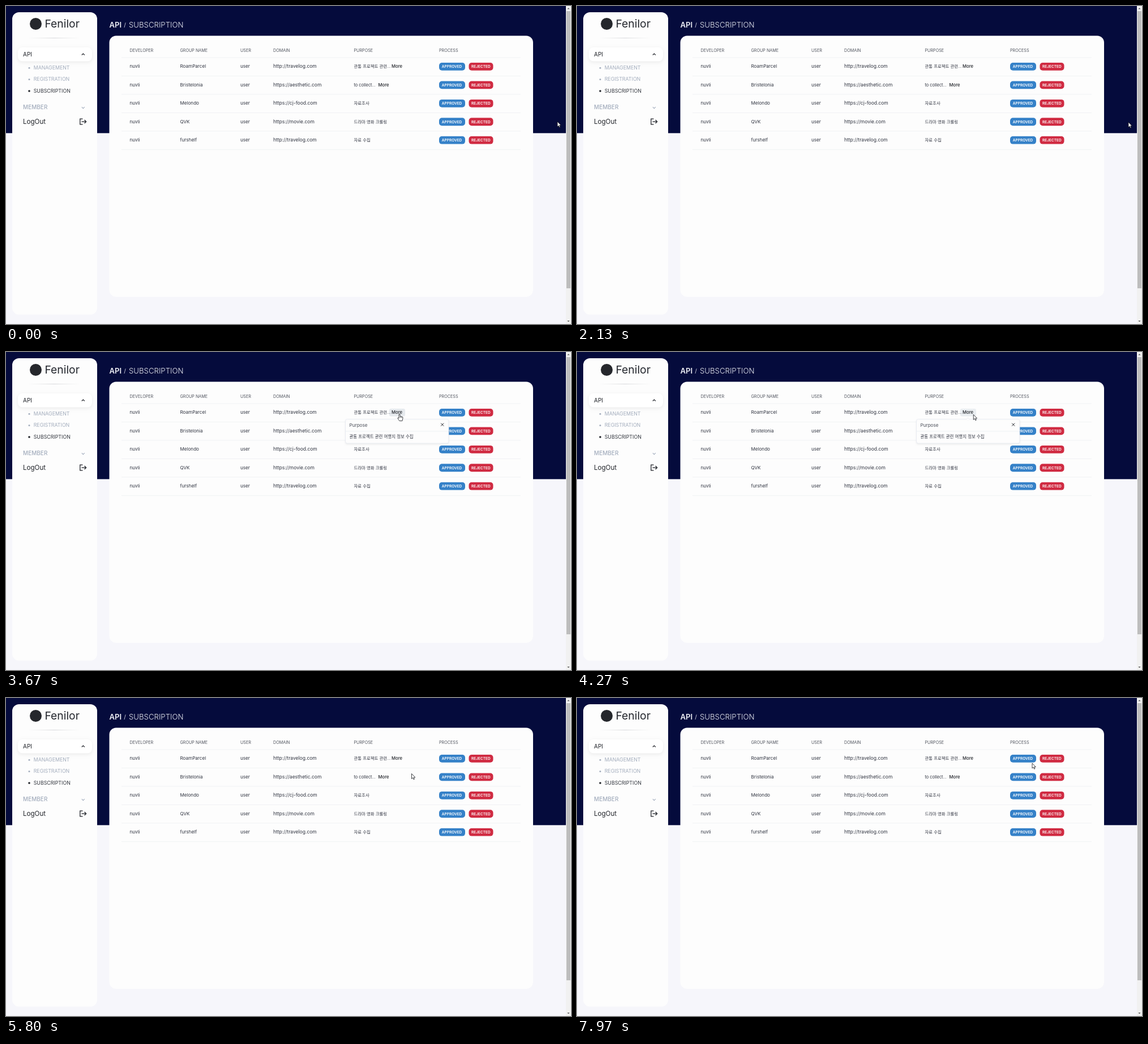
Recreate the animation shown at these times as an HTML page with a canvas. Size 998 by 561 pixels, loop 8 s.

```html
<!DOCTYPE html>
<html lang="en">
<head>
<meta charset="utf-8">
<title>API subscription</title>
<style>
html, body { margin: 0; width: 100%; height: 100%; overflow: hidden; background: #f6f6fb; }
canvas { display: block; width: 998px; height: 561px; }
</style>
</head>
<body>
<canvas id="stage"></canvas>
<script>
const W = 998, H = 561, LOOP = 8000;
const canvas = document.getElementById('stage');
const ctx = canvas.getContext('2d');
const ratio = window.devicePixelRatio || 1;
canvas.width = W * ratio;
canvas.height = H * ratio;

const FONT = 'Inter, "Noto Sans CJK KR", "Noto Sans CJK", sans-serif';
const INK = '#303440', CARD = '#fdfdfd', GREY = '#a3adbd';

const rows = [
  ['nuvli', 'RoamParcel', 'user', 'http://travelog.com', '관통 프로젝트 관련...', 681],
  ['nuvli', 'Bristelonia', 'user', 'https://aesthetic.com', 'to collect...', 657.5],
  ['nuvli', 'Melondo', 'user', 'https://cj-food.com', '자료조사'],
  ['nuvli', 'QVK', 'user', 'https://movie.com', '드라마 영화 크롤링'],
  ['nuvli', 'furshelf', 'user', 'http://travelog.com', '자료 수집']
];
const columns = [218.5, 307.5, 414, 472, 614.5, 765];
const headings = ['DEVELOPER', 'GROUP NAME', 'USER', 'DOMAIN', 'PURPOSE', 'PROCESS'];

const popups = [
  { x: 599.5, y: 118.5, tip: 690.5, body: '관통 프로젝트 관련 여행지 정보 수집', from: 3340, to: 5240 },
  { x: 576, y: 151, tip: 667.5, body: 'to collect perfume data', from: 6230, to: 7120 }
];
// Hovered buttons: x, y, width, height, start, end
const moreHovers = [[677, 100, 28, 13.5, 3130, 4250], [653.5, 132.5, 28, 13.5, 6080, 6480]];
const closeHovers = [[764, 121.5, 13.5, 13.5, 4930, 5250], [740.5, 154, 13.5, 13.5, 6860, 7130]];

// Pointer path: time, x, y
const path = [
  [0, 974, 204], [1800, 974, 204], [2130, 974, 205], [2470, 918, 186],
  [3150, 694, 109], [3670, 695, 109], [4150, 695, 109], [4900, 771, 129],
  [5040, 773, 128], [5260, 772, 129], [5800, 716.5, 133.5], [6110, 667, 141],
  [6420, 667, 141], [6900, 753, 159], [7130, 749, 160], [7650, 795, 122], [7970, 804, 115], [8000, 804, 115]
];

const clamp = v => Math.max(0, Math.min(1, v));
const smooth = v => v * v * (3 - 2 * v);

function text(str, x, y, size, color = INK, weight = 400) {
  ctx.font = `${weight} ${size}px ${FONT}`;
  ctx.fillStyle = color;
  ctx.fillText(str, x, y);
}

function box(x, y, w, h, r, fill, stroke) {
  ctx.beginPath();
  ctx.roundRect(x, y, w, h, r);
  ctx.fillStyle = fill;
  ctx.fill();
  if (stroke) line(stroke, 0.7);
}

function line(color, width) {
  ctx.strokeStyle = color;
  ctx.lineWidth = width;
  ctx.stroke();
}

function poly(points, color, width) {
  ctx.beginPath();
  points.forEach(([x, y]) => ctx.lineTo(x, y));
  line(color, width);
}

function dot(x, y, r, color) {
  ctx.beginPath();
  ctx.arc(x, y, r, 0, Math.PI * 2);
  ctx.fillStyle = color;
  ctx.fill();
}

function shadow(blur, color, draw) {
  ctx.save();
  ctx.shadowBlur = blur * ratio;
  ctx.shadowColor = color;
  ctx.shadowOffsetY = 2 * ratio;
  draw();
  ctx.restore();
}

function fadeLine(x1, x2, y) {
  const g = ctx.createLinearGradient(x1, 0, x2, 0);
  g.addColorStop(0, '#e0e1e200');
  g.addColorStop(0.5, '#d6d7da');
  g.addColorStop(1, '#e0e1e200');
  ctx.fillStyle = g;
  ctx.fillRect(x1, y, x2 - x1, 1);
}

function scrollbar() {
  ctx.fillStyle = '#f1f1f1';
  ctx.fillRect(989, 0, 9, H);
  ctx.fillStyle = '#bdbdbd';
  ctx.fillRect(990, 9, 7, 489);
  ctx.fillStyle = '#606060';
  for (const [y, d] of [[5.5, -2.2], [555, 2.2]]) {
    ctx.beginPath();
    ctx.moveTo(991.3, y);
    ctx.lineTo(995.7, y);
    ctx.lineTo(993.5, y + d);
    ctx.fill();
  }
}

function sidebar() {
  box(11, 11, 150, 533.5, 12, CARD);
  dot(52.5, 31.5, 10.5, '#25272c');
  text('Fenilor', 68.5, 37.5, 19.3, '#23262d');
  fadeLine(38, 132, 56);
  shadow(6, '#00000012', () => box(21, 73, 131, 24.5, 8, '#ffffff'));
  text('API', 30, 88.5, 10, '#202329');
  poly([[133.8, 86.5], [136.3, 84], [138.8, 86.5]], '#202329', 1.1);
  [['MANAGEMENT', 112.2], ['REGISTRATION', 132.4], ['SUBSCRIPTION', 153]].forEach(([label, y], i) => {
    const active = i === 2;
    dot(41, y - 3, active ? 1.8 : 1.5, active ? '#202329' : GREY);
    text(label, 48.7, y, 8.8, active ? '#33373f' : GREY);
  });
  text('MEMBER', 30, 182.3, 10, GREY, 500);
  poly([[133.8, 178.2], [136.3, 180.7], [138.8, 178.2]], GREY, 1.1);
  text('LogOut', 30, 207.6, 11.6, '#202329');
  poly([[135.5, 199.2], [130.8, 199.2], [130.8, 208.8], [135.5, 208.8]], '#202329', 1.3);
  poly([[133.5, 204], [141.3, 204]], '#202329', 1.3);
  poly([[138.6, 201], [141.6, 204], [138.6, 207]], '#202329', 1.3);
}

function hoverAlpha([, , , , from, to], t) {
  return Math.min(clamp((t - from) / 150), clamp((to + 120 - t) / 120));
}

function hoverBox(h, t) {
  ctx.save();
  ctx.globalAlpha *= hoverAlpha(h, t);
  box(h[0], h[1], h[2], h[3], 3, '#e6eaee');
  ctx.restore();
}

function table(t) {
  box(182.5, 52.5, 748.5, 460.5, 12, CARD);
  headings.forEach((label, i) => text(label, columns[i], 81.1, 7.2, '#50545e'));
  for (let i = 0; i < 6; i++) {
    ctx.fillStyle = '#eff1f3';
    ctx.fillRect(204, 90.5 + i * 32.45, 705, 0.9);
  }
  moreHovers.forEach(h => hoverBox(h, t));
  rows.forEach((row, i) => {
    const y = 109.2 + i * 32.45;
    row.slice(0, 5).forEach((cell, c) => {
      const size = c === 3 ? 8.5 : c === 4 ? 7.4 : 8.1;
      text(cell, columns[c], y, size);
    });
    if (row[5]) text('More', row[5], y, 7.7, '#202329', 500);
    box(765, y - 9.2, 46, 13.8, 5, '#3581c8');
    text('APPROVED', 769.8, y + 0.1, 6.5, '#ffffff', 600);
    box(817.5, y - 9.2, 43, 13.8, 5, '#d02b42');
    text('REJECTED', 822, y + 0.1, 6.5, '#ffffff', 600);
  });
}

function popup(p, hover, t) {
  const a = Math.min(clamp((t - p.from) / 150), clamp((p.to + 100 - t) / 100));
  if (a <= 0) return;
  const s = 0.95 + 0.05 * a, cx = p.x + 91, cy = p.y + 21;
  ctx.save();
  ctx.globalAlpha = a;
  ctx.translate(cx, cy);
  ctx.scale(s, s);
  ctx.translate(-cx, -cy);
  shadow(3, '#0000000d', () => box(p.x, p.y, 182.5, 42.5, 3, CARD, '#e2e7ef'));
  ctx.beginPath();
  ctx.moveTo(p.tip - 3, p.y + 0.5);
  ctx.lineTo(p.tip, p.y - 2.5);
  ctx.lineTo(p.tip + 3, p.y + 0.5);
  ctx.fillStyle = CARD;
  ctx.fill();
  line('#e2e7ef', 0.7);
  text('Purpose', p.x + 7, p.y + 13, 8.1, '#4a4e58');
  ctx.fillStyle = '#e9edf2';
  ctx.fillRect(p.x, p.y + 21, 182.5, 0.8);
  text(p.body, p.x + 7, p.y + 33.5, /^[a-z]/.test(p.body) ? 8 : 7.45);
  hoverBox(hover, t);
  const x = p.x + 171.2, y = p.y + 9.6;
  poly([[x - 2.5, y - 2.5], [x + 2.5, y + 2.5]], '#202329', 1);
  poly([[x + 2.5, y - 2.5], [x - 2.5, y + 2.5]], '#202329', 1);
  ctx.restore();
}

function pointerAt(t) {
  const i = Math.max(1, path.findIndex(k => k[0] > t));
  const [t0, x0, y0] = path[i - 1], [t1, x1, y1] = path[i];
  const k = smooth(clamp((t - t0) / (t1 - t0)));
  return [x0 + (x1 - x0) * k, y0 + (y1 - y0) * k];
}

const arrow = new Path2D('M0 0V9L2.1 7.1L3.6 10.3L5 9.6L3.6 6.6H6.3Z');
const hand = new Path2D('M-1 1Q0-.7 1 1V4.6L5 5.4Q6.2 5.8 6 7.2L5 12.5H0L-3 8.4Q-3.4 7-2.3 7L-1 8Z');

function pointer(t) {
  const over = [...moreHovers, ...closeHovers].some(h => t >= h[4] && t < h[5]);
  const [x, y] = pointerAt(t);
  ctx.save();
  ctx.translate(x, y);
  ctx.fillStyle = '#ffffff';
  const shape = over ? hand : arrow;
  ctx.fill(shape);
  ctx.strokeStyle = '#15171c';
  ctx.lineWidth = 0.8;
  ctx.stroke(shape);
  if (over) {
    for (const dx of [1, 2.6, 4.2]) poly([[dx, 5], [dx, 7]], '#15171c', 0.5);
  }
  ctx.restore();
}

function draw(now) {
  const t = now % LOOP;
  ctx.setTransform(ratio, 0, 0, ratio, 0, 0);
  ctx.fillStyle = '#f6f6fb';
  ctx.fillRect(0, 0, W, H);
  ctx.fillStyle = '#050b3c';
  ctx.fillRect(0, 0, 989, 224.3);
  scrollbar();
  sidebar();
  text('API', 182.5, 37.5, 13.1, '#f0f1f7', 600);
  text('/', 208.3, 37, 10, '#d8dae6');
  text('SUBSCRIPTION', 217, 37.5, 13.2, '#eceef5', 300);
  table(t);
  popups.forEach((p, i) => popup(p, closeHovers[i], t));
  pointer(t);
}

const start = performance.now();
function tick() {
  draw(performance.now() - start);
  requestAnimationFrame(tick);
}
tick();
</script>
</body>
</html>
```
